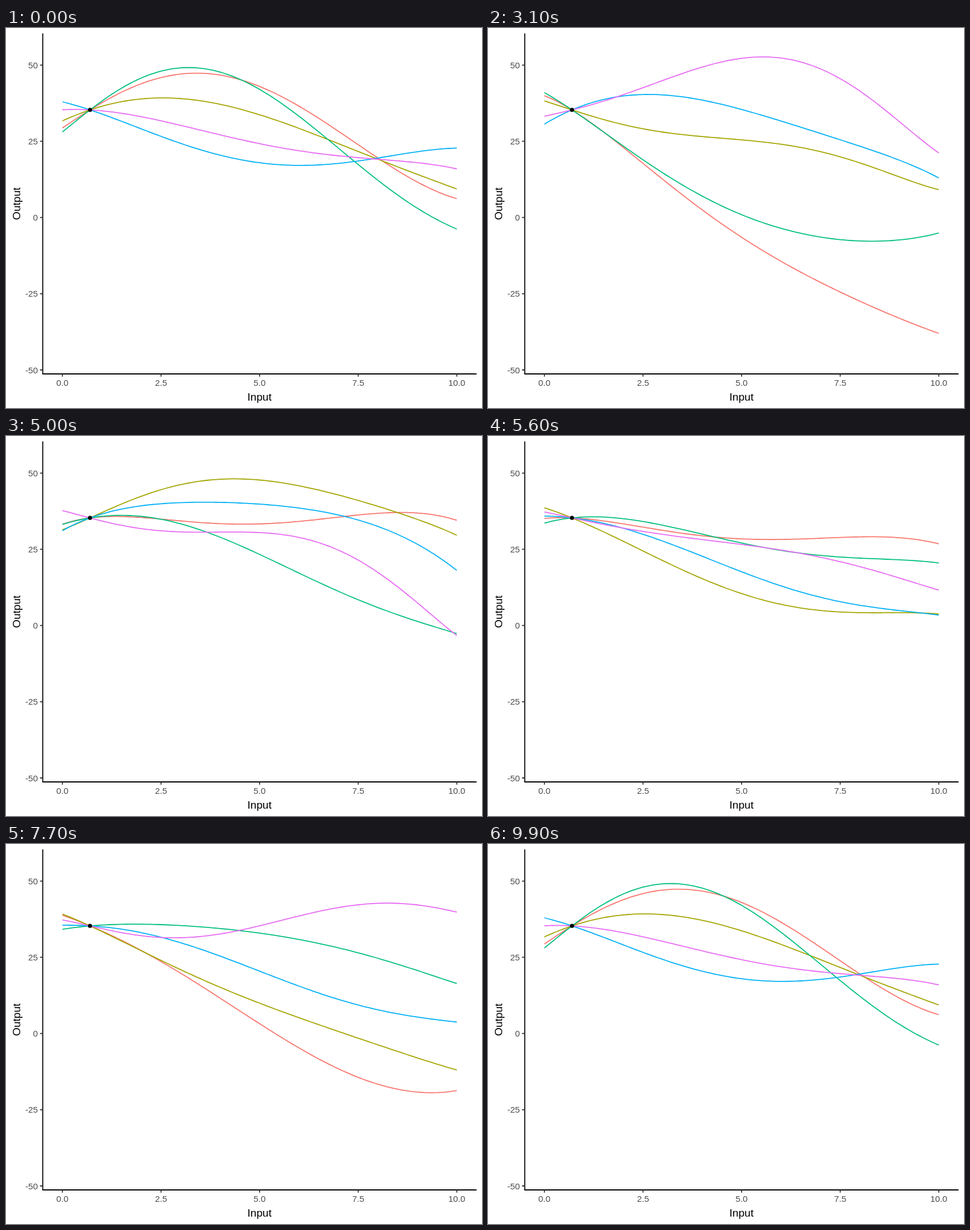
Write an HTML page that moves like this. It is 837 px wide and 669 px high and loops after 10 s.

```html
<!DOCTYPE html>
<html lang="en">
<head>
<meta charset="utf-8">
<title>Curves through one point</title>
<style>
  html, body { margin: 0; width: 100%; height: 100%; overflow: hidden; background: #fff; }
  svg { display: block; font-family: "Liberation Sans", Arial, sans-serif; }
  .labels { font-size: 15.3px; fill: #4d4d4d; }
  .titles { font-size: 19.1px; text-anchor: middle; }
  .lines { fill: none; stroke-width: 1.8; }
</style>
</head>
<body>
<svg width="837" height="669">
  <g id="plot" class="lines"></g>
  <circle cx="147.7" cy="144.2" r="3.6"/>
  <path class="lines" stroke="#000" d="M64.6 9.5V609H827.5"/>
  <path id="ticks" class="lines" stroke="#333"/>
  <g id="labels" class="labels"></g>
  <g class="titles">
    <text x="445.8" y="655.6">Input</text>
    <text transform="translate(25 309.3) rotate(-90)">Output</text>
  </g>
</svg>
<script>
const byId = id => document.getElementById(id);

function add(parent, tag, attrs, text = "") {
  const el = document.createElementNS("http://www.w3.org/2000/svg", tag);
  for (const name in attrs) el.setAttribute(name, attrs[name]);
  el.textContent = text;
  return parent.appendChild(el);
}

// Axes
let tickPath = "";
for (let i = 0; i < 5; i++) {
  const x = 99.2 + i * 173.37, y = 65.3 + i * 134.17;
  tickPath += `M${x} 609v4.8M64.6 ${y}h-4.8`;
  add(byId("labels"), "text", { x, y: 630.2, "text-anchor": "middle" }, (i * 2.5).toFixed(1));
  add(byId("labels"), "text", { x: 56, y: y + 5.6, "text-anchor": "end" }, 50 - i * 25);
}
byId("ticks").setAttribute("d", tickPath);

// Each curve is a polynomial through its knots; all share the second one.
const shared = 144.2;
const knots = [99.2, 147.7, 339.2, 550, 690, 792.7];

// Lagrange weights of the knots at each sample
const samples = Array.from({ length: 101 }, (_, i) => {
  const x = knots[0] + (knots.at(-1) - knots[0]) * i / 100;
  const weights = knots.map(a =>
    knots.reduce((w, b) => a === b ? w : w * (x - b) / (a - b), 1));
  return { x, weights };
});

// Heights at the free knots, one row per pose
const curve = (stroke, ...poses) => ({ path: add(byId("plot"), "path", { stroke }), poses });
const curves = [
  curve("#f8766d",
    [176, 79.6, 159, 252, 300.5],
    [115, 307.5, 462, 538, 581.5],
    [157, 149, 141, 127.5, 141.5],
    [140, 180.3, 198.6, 199, 210.6],
    [121.6, 264.2, 423.4, 490.2, 490]),
  curve("#a3a500",
    [163.5, 127.7, 190, 245, 283.5],
    [123.5, 202.2, 227, 266, 299.5],
    [171.5, 54, 60.6, 106, 151.6],
    [107, 311.8, 406.6, 399.2, 382.6],
    [127.4, 217, 296, 357.2, 401.8]),
  curve("#00bf7d",
    [183, 70.5, 183, 295, 354],
    [109, 287, 372, 380, 360],
    [156, 164.5, 266.3, 331.6, 368.6],
    [152.2, 163.8, 180.7, 167.2, 161.4],
    [149.7, 141.1, 173.6, 223.3, 266.8]),
  curve("#00b0f6",
    [130, 213.5, 241, 223, 211.5],
    [169, 122.8, 182, 228, 268.5],
    [171, 103.2, 108.4, 152.3, 223.5],
    [128, 237.2, 345.9, 368, 354.7],
    [146.7, 170.9, 241.6, 282, 303.2]),
  curve("#e76bf3",
    [144, 179.1, 221, 234, 248],
    [158, 71.3, 46, 123, 204],
    [131, 168, 184.6, 271, 364.7],
    [134.7, 181.7, 216.2, 226.8, 231.4],
    [133.4, 158.5, 94.3, 74, 92])
];

function pathThrough([first, ...rest]) {
  const ys = [first, shared, ...rest];
  return "M" + samples.map(({ x, weights }) =>
    `${x} ${weights.reduce((sum, w, j) => sum + w * ys[j], 0)}`).join("L");
}

// Tenths of a second at which the move away from a pose begins
const moveStart = pose => pose * 20 + (pose < 2 ? 11 : 10);
let shown = -1;

function draw() {
  const step = Math.floor(performance.now() / 100) % 100;
  if (step !== shown) {
    shown = step;
    let pose = 0;
    while (pose < 4 && step >= moveStart(pose + 1)) pose++;
    const mix = Math.max(0, Math.min(10, step - moveStart(pose) + 1)) / 10;
    for (const { path, poses } of curves) {
      const next = poses[(pose + 1) % 5];
      path.setAttribute("d", pathThrough(poses[pose].map((y, j) => y + (next[j] - y) * mix)));
    }
  }
  requestAnimationFrame(draw);
}
draw();
</script>
</body>
</html>
```
